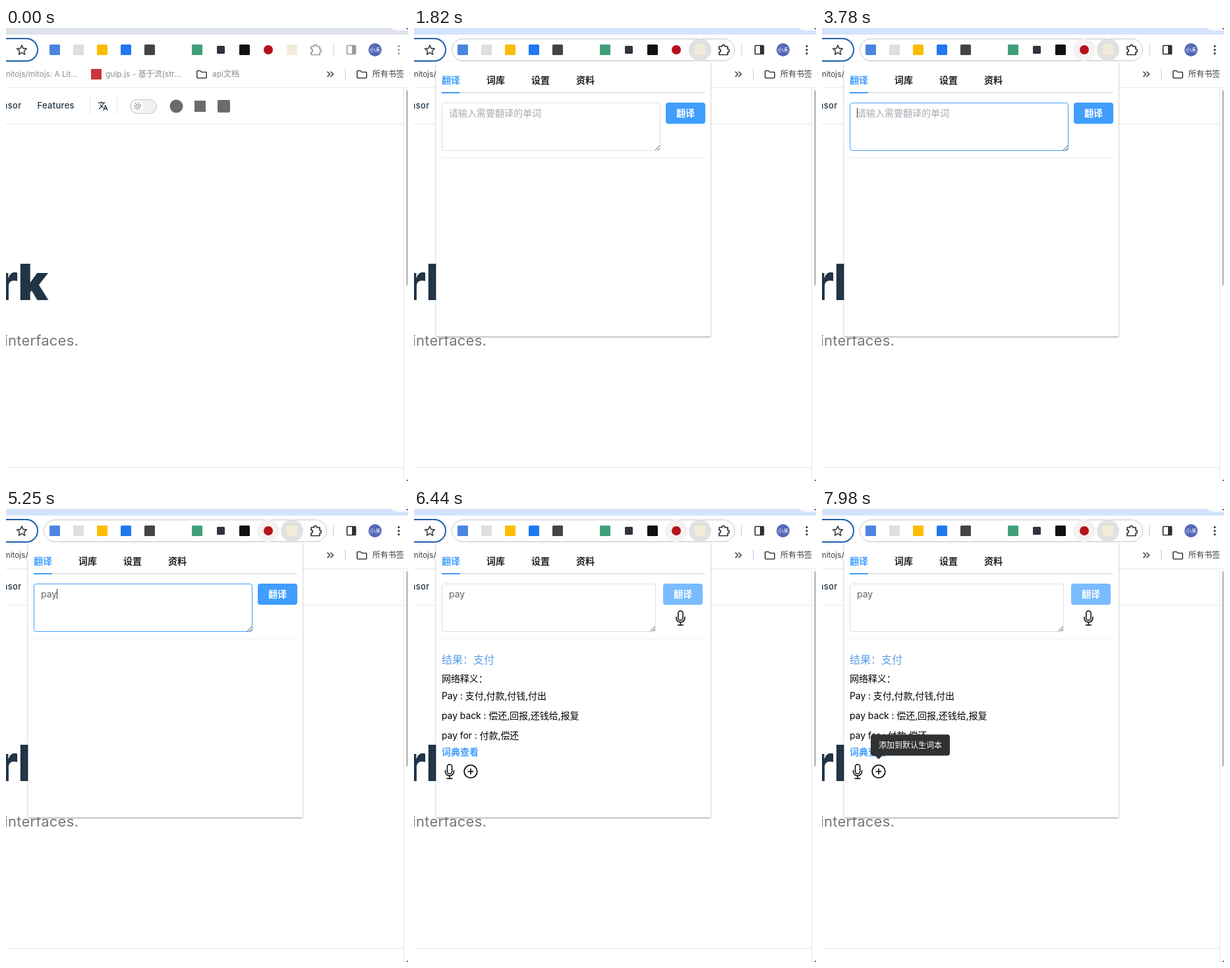
An HTML page for the animation above (8 s loop, 610 by 686 pixels).

```html
<!DOCTYPE html>
<html lang="zh-CN">
<head>
<meta charset="utf-8">
<style>
html, body { margin: 0; width: 100%; height: 100%; overflow: hidden; background: #fff; }
svg { display: block; width: 610px; height: 686px; font: 14px Inter, "Noto Sans CJK SC", "Noto Sans CJK", sans-serif; }
text { white-space: pre; }
.line { fill: none; stroke: #e6e6e6; }
.ink { fill: none; stroke: #3c4043; stroke-width: 1.6; }
.tool { color: #9a9a9a; }
.label { fill: #8c8c8c; font-size: 12px; }
.active .tool { color: #303134; }
.active .label { fill: #3c4043; }
.nav { font-size: 13px; font-weight: 500; letter-spacing: .3px; fill: #213547; }
.bold { font-weight: 600; }
.blue { fill: #409eff; }
</style>
</head>
<body>
<svg id="stage" viewBox="0 0 610 686">
  <defs>
    <g id="mic" fill="none" stroke="#000" stroke-width="1.5" stroke-linecap="round">
      <rect x="-3.6" y="-10.8" width="7.2" height="14.4" rx="3.6"/>
      <path d="M-6.5-1.4V0a6.5 6.5 0 0 0 13 0v-1.4M0 6.5v4.3M-4 10.8h8"/>
    </g>
    <path id="folder" class="ink" stroke-linejoin="round" d="M.8 1.8a1 1 0 0 1 1-1h4l2 2h6.4a1 1 0 0 1 1 1v7a1 1 0 0 1-1 1H1.8a1 1 0 0 1-1-1z"/>
    <filter id="shadow" x="-5%" y="-5%" width="110%" height="110%">
      <feDropShadow dx="0" dy="1" stdDeviation="1.3" flood-opacity=".42"/>
    </filter>
  </defs>

  <!-- browser chrome -->
  <rect width="610" height="686" fill="#fff"/>
  <rect id="strip" width="610" height="10"/>
  <path d="M584 0q3 4 9 4h17V0z" fill="#f6f8fc"/>
  <path d="M606 0h4v4q0-3-4-4zM606 686h4v-4q0 3-4 4z" fill="#555"/>
  <rect x="-60" y="16" width="108" height="34" rx="17" fill="#fff" stroke="#1f5fae" stroke-width="2"/>
  <path class="ink" stroke-linejoin="round" d="M24 26l2.1 4.9 5.3.5-4 3.5 1.2 5.2-4.6-2.8-4.6 2.8 1.2-5.2-4-3.5 5.3-.5z"/>
  <g id="pill">
    <rect x="57.5" y="16.5" width="429" height="33" rx="16.5" fill="#fff" stroke="#c4c7c5"/>
    <circle cx="434" cy="33" r="17" fill="#e1e1e1"/>
  </g>
  <circle id="near" cx="398" cy="33" r="17" fill="#f6f1f2"/>
  <g id="icons"></g>
  <g class="tool" fill="none" stroke="currentColor" stroke-width="1.7">
    <path stroke-linejoin="round" d="M463 28h4.2a2.3 2.3 0 0 1 4.6 0h4.2v4a2.4 2.4 0 0 1 0 4.8v3.7h-13v-4a2.3 2.3 0 0 0 0-4.6z"/>
    <rect x="517.5" y="26.5" width="13" height="13" rx="1"/>
    <path d="M527.5 27v12" stroke-width="5"/>
    <path d="M596 27.5h.01M596 33h.01M596 38.5h.01" stroke-width="3.2" stroke-linecap="round"/>
  </g>
  <path d="M497 25v16M515 62v16" stroke="#c9d8f5" stroke-width="1.5"/>
  <circle cx="560" cy="33" r="10" fill="#5567b8"/>
  <text x="560" y="36" font-size="8.5" fill="#fff" text-anchor="middle">小禾</text>

  <text class="label" x="108.5" y="74" text-anchor="end" style="font-size:11.8px">mitojs/mitojs: A Lit...</text>
  <rect x="129" y="62" width="16" height="16" rx="1" fill="#c9373e"/>
  <text class="label" x="151" y="74">gulp.js - 基于流(str...</text>
  <use href="#folder" x="289" y="64"/>
  <text class="label" x="313" y="74">api文档</text>
  <path class="ink" d="M487.5 66l4 4-4 4M492.5 66l4 4-4 4"/>
  <use href="#folder" x="532" y="64"/>
  <text x="556" y="74" font-size="12" fill="#3c4043">所有书签</text>

  <!-- page -->
  <path class="line" d="M0 90.5h610M0 145.5h603M0 665.5h603M603.5 91v595M127.5 106v25M168.5 106v25"/>
  <rect x="607" y="94" width="6" height="296" rx="3" fill="#c1c1c1"/>
  <text class="nav" x="23.5" y="122" text-anchor="end">Sponsor</text>
  <text class="nav" x="47.5" y="122">Features</text>
  <path transform="translate(139 110) scale(.68)" fill="#213547" d="M12.87 15.07l-2.54-2.51.03-.03c1.74-1.94 2.98-4.17 3.71-6.53H17V4h-7V2H8v2H1v2h11.17C11.5 7.92 10.44 9.75 9 11.35 8.07 10.32 7.3 9.19 6.69 8h-2c.73 1.63 1.73 3.17 2.98 4.56l-5.09 5.02L4 19l5-5 3.11 3.11zM18.5 10h-2L12 22h2l1.12-3h4.75L21 22h2zm-2.62 7l1.62-4.33L19.12 17z"/>
  <rect x="188.5" y="108.5" width="40" height="21" rx="10.5" fill="#f1f1f1" stroke="#c6c6c6"/>
  <circle cx="199.5" cy="118.5" r="9" fill="#fff"/>
  <g fill="none" stroke="#666">
    <circle cx="199.5" cy="118.5" r="2.6"/>
    <circle cx="199.5" cy="118.5" r="5" stroke-width="1.6" stroke-dasharray="1.2 2.727"/>
  </g>
  <g fill="#6b6b6b">
    <circle cx="258.5" cy="118.5" r="10"/>
    <rect x="286" y="110" width="17" height="17"/>
    <rect x="321" y="109" width="19" height="19" rx="2"/>
  </g>
  <text x="62.5" y="412" text-anchor="end" font-size="76" font-weight="900" letter-spacing="-1.5" fill="#213547">Framework</text>
  <text x="110" y="481" text-anchor="end" font-size="22" letter-spacing=".2" fill="#767676">interfaces.</text>

  <!-- popup -->
  <g id="popup">
    <rect x="33.5" y="51" width="416.5" height="416" rx="1" fill="#fff" filter="url(#shadow)"/>
    <g class="bold" fill="#222">
      <text class="blue" x="42" y="84">翻译</text>
      <text x="110" y="84">词库</text>
      <text x="178" y="84">设置</text>
      <text x="246" y="84">资料</text>
    </g>
    <rect x="42" y="97" width="399.5" height="2" fill="#dfe2e8"/>
    <rect id="tab" class="blue" x="42" y="97" height="2"/>
    <path d="M42 196.5h400" stroke="#f0f0f0"/>
    <rect id="box" x="42.5" y="113.5" height="72" rx="3.5" fill="#fff"/>
    <path id="grip" d="M366 185l7-7M370 185l3-3" stroke="#555"/>
    <text id="word" x="53" y="133.5"></text>
    <path id="caret" d="M0 121v15" stroke="#333"/>
    <g id="go">
      <rect id="face" x="382" y="113" width="60" height="32" rx="4"/>
      <text class="bold" x="412" y="134" fill="#fff" text-anchor="middle">翻译</text>
    </g>
    <g id="result">
      <use href="#mic" x="404.5" y="165"/>
      <text x="42" y="234" font-size="16" fill="#5a9fea">结果：支付</text>
      <g letter-spacing="-.09">
        <text x="42" y="262">网络释义：</text>
        <text x="42" y="287.5">Pay : 支付,付款,付钱,付出</text>
        <text x="42" y="317.5">pay back : 偿还,回报,还钱给,报复</text>
        <text x="42" y="347.5">pay for : 付款,偿还</text>
      </g>
      <text class="blue bold" x="42" y="373">词典查看</text>
      <use href="#mic" x="54" y="397.5"/>
      <g fill="none" stroke="#000" stroke-width="1.6">
        <circle cx="86" cy="397.5" r="9.8"/>
        <path d="M81.5 397.5h9M86 393v9"/>
      </g>
    </g>
    <g id="tip">
      <path d="M80 373h12l-6 6z" fill="#303133"/>
      <rect x="74" y="341.5" width="120" height="32" rx="4" fill="#303133"/>
      <text x="86" y="362" font-size="12" fill="#fff">添加到默认生词本</text>
    </g>
  </g>
</svg>
<script>
const $ = id => document.getElementById(id);
const LOOP = 8000, STEP = 70;

// Toolbar buttons sit 36px apart; an empty entry leaves its slot free.
const colors = ['#4a86e0', '#dedede', '#fbbc04', '#1f78f0', '#444', '', '#41a07a', '#30343c', '#111', '#b5121b', '#f1ecd8'];
$('icons').innerHTML = colors.map((c, i) => {
  if (!c) return '';
  const x = 74 + 36 * i, r = i === 9 ? 7 : 1.5, s = i === 7 ? 12 : i === 9 ? 14 : 16;
  return `<rect x="${x - s / 2}" y="${33 - s / 2}" width="${s}" height="${s}" rx="${r}" fill="${c}"/>`;
}).join('');

const mix = (a, b, p) => `color-mix(in srgb, ${b} ${p * 100}%, ${a})`;
const show = (id, on) => $(id).setAttribute('opacity', +on);
const set = (id, name, value) => $(id).setAttribute(name, value);
const paint = (id, name, value) => { $(id).style[name] = value; };

function draw(time) {
  const t = time - time % STEP;
  const ramp = (a, b) => Math.min(1, Math.max(0, (t - a + STEP) / (b - a + STEP)));
  const during = (a, b) => t >= a && t < b;

  const active = t >= 1470, done = t >= 6440;
  $('stage').classList.toggle('active', active);
  set('strip', 'fill', active ? '#d3e3fd' : '#dde2e9');
  show('pill', ramp(1470, 1680));
  show('near', t >= 1890);
  show('popup', t >= 1820);
  set('tab', 'width', t >= 1890 ? 28 : 27);

  // text box
  const hover = during(6860, 6930) ? 0.6 : ramp(2240, 2520) * (1 - ramp(5740, 5950));
  const focus = ramp(2730, 3080) * (1 - ramp(6090, 6300));
  paint('box', 'stroke', mix(mix('#dcdfe6', '#c0c4cc', hover), '#409eff', focus));
  set('box', 'width', done ? 324 : 331);
  set('grip', 'transform', `translate(${done ? -7 : 0} 0)`);

  const typed = 'pay'.slice(0, [3920, 4130, 4200].filter(k => t >= k).length);
  $('word').textContent = typed || '请输入需要翻译的单词';
  set('word', 'fill', typed ? '#606266' : '#a8abb2');
  const end = typed ? $('word').getComputedTextLength() : 0;
  set('caret', 'transform', `translate(${Math.round(53 + end) + 0.5} 0)`);
  const blinkOff = during(3290, 3780) || during(4760, 5250) || during(5740, 6090);
  show('caret', during(2800, 6090) && !blinkOff);

  // button and result
  const press = ramp(6090, 6160) * (1 - ramp(6230, 6300));
  paint('face', 'fill', mix(mix('#409eff', '#79bbff', ramp(5740, 5950)), '#337ecc', press));
  set('go', 'transform', `translate(${done ? -4 : 0} 0)`);
  show('result', done);
  show('tip', ramp(7770, 7980));
}

function frame() {
  draw(performance.now() % LOOP);
  requestAnimationFrame(frame);
}
frame();
</script>
</body>
</html>
```
